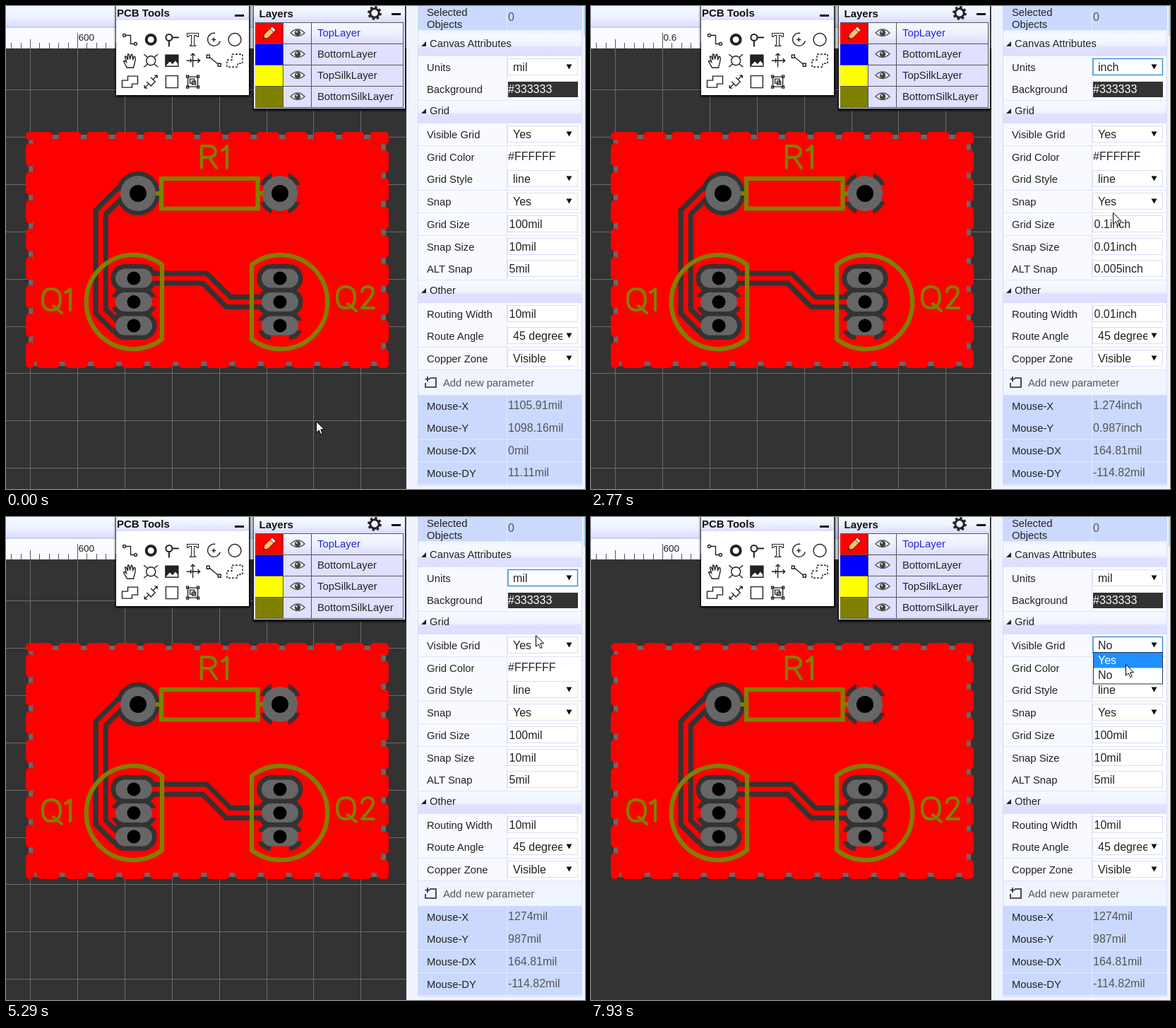
Recreate the animation shown at these times as an HTML page. Size 820 px wide and 683 px high, loop 8 s.

```html
<!DOCTYPE html>
<html lang="en">
<head>
<meta charset="utf-8">
<title>Board editor settings</title>
<style>
html, body { margin: 0; width: 100%; height: 100%; overflow: hidden; background: #333; }
svg { display: block; width: 820px; height: 683px; }
text { font: 14.8px "Liberation Sans", Arial, sans-serif; fill: #222; white-space: pre; }
.val { font-size: 16px; }
.title { font-weight: bold; font-size: 15px; fill: #111; }
.grid { stroke: #6c6c6c; stroke-width: 1; fill: none; }
.gap { stroke: #333; fill: none; stroke-width: 21; }
.trace { stroke: #f00; fill: none; stroke-width: 7; }
.silk { stroke: #808000; fill: none; stroke-width: 6.2; }
.letter { stroke: #808000; fill: none; stroke-width: 4; stroke-linecap: round; stroke-linejoin: round; }
.icon { stroke: #222; fill: none; stroke-width: 1.4; }
</style>
</head>
<body>
<svg id="stage" viewBox="0 0 820 683" xmlns="http://www.w3.org/2000/svg">
  <defs>
    <linearGradient id="head" x2="0" y2="1">
      <stop offset="0" stop-color="#f4f8ff"/><stop offset=".5" stop-color="#eef2ff"/><stop offset="1" stop-color="#dcdcff"/>
    </linearGradient>
    <linearGradient id="group" x2="0" y2="1">
      <stop offset="0" stop-color="#f6faff"/><stop offset=".5" stop-color="#f0f4ff"/>
      <stop offset=".62" stop-color="#e0e0ff"/><stop offset="1" stop-color="#dedeff"/>
    </linearGradient>
    <filter id="soft" x="-10%" y="-10%" width="120%" height="120%"><feGaussianBlur stdDeviation="1.5"/></filter>
    <clipPath id="clip"><rect x="711" y="0" width="77" height="683"/></clipPath>
  </defs>

  <rect width="820" height="683" fill="#333"/>
  <g id="grid" class="grid"></g>

  <!-- copper area -->
  <rect x="35" y="185" width="500" height="321" fill="#f00" stroke="#686868" stroke-width="6"/>
  <rect x="38" y="188" width="494" height="315" fill="#f00"/>
  <path d="M34 184H536V506H34Z" fill="none" stroke="#f00" stroke-width="12"
        stroke-linecap="round" stroke-linejoin="round" stroke-dasharray="21 19.14" stroke-dashoffset="-5.4"/>
  <path d="M34 184h.1M536 184h.1M536 506h.1M34 506h.1" stroke="#f00" stroke-width="12" stroke-linecap="round"/>
  <g id="board"></g>
  <g class="silk">
    <path d="M220 244H356.5V286.5H220ZM212 265h7M357 265h7"/>
    <path d="M221 366A66.5 66.5 0 1 0 221 471Z"/>
    <path d="M348 366A66.5 66.5 0 1 1 348 471Z"/>
  </g>
  <g class="letter">
    <path d="M277 229V198H288Q297 199 297 206Q297 213 288 214H277M288 214L298 229M306 204Q311 202 313 198V229"/>
    <path d="M64 400Q52 400 52 415Q52 430 64 430Q77 430 77 415Q77 400 64 400M67 424L79 434M84 405Q89 403 91 400V430"/>
    <path d="M481 397Q469 397 469 412Q469 427 481 427Q494 427 494 412Q494 397 481 397M484 421L496 431M504 404Q505 397 512 397Q520 397 520 404Q520 409 504 427H521"/>
  </g>

  <!-- toolbar and ruler -->
  <rect width="568" height="30" fill="url(#head)"/>
  <rect y="29" width="568" height="2" fill="#c3d3ee"/>
  <rect y="31" width="568" height="29" fill="#fbfcff"/>
  <path id="ticks" stroke="#555" fill="none"/>
  <text id="mark" x="102.5" y="48.5" style="font-size:13.6px"></text>

  <!-- tool window -->
  <rect x="155" y="-4" width="191" height="132" fill="#000" filter="url(#soft)"/>
  <rect x="156" y="0" width="188" height="20" fill="url(#head)"/>
  <rect x="156" y="20" width="188" height="106" fill="#fff"/>
  <text class="title" x="157" y="15">PCB Tools</text>
  <path d="M324 13.5h13" stroke="#111" stroke-width="3"/>
  <g id="tools" class="icon"></g>

  <!-- layer window -->
  <rect x="350" y="-4" width="217" height="152" fill="#000" filter="url(#soft)"/>
  <rect x="351" y="0" width="214" height="145" fill="#e2e2ff"/>
  <rect x="351" y="0" width="214" height="22" fill="url(#head)"/>
  <text class="title" x="358.5" y="16">Layers</text>
  <circle cx="522" cy="10" r="6.2" fill="none" stroke="#222" stroke-width="3"/>
  <circle cx="522" cy="10" r="8.4" fill="none" stroke="#222" stroke-width="3" stroke-dasharray="3.3"/>
  <path d="M546 11.5h13" stroke="#111" stroke-width="3"/>
  <g id="layers"></g>

  <!-- property panel -->
  <rect x="567" width="253" height="683" fill="#f1f4fd"/>
  <path d="M583.5 0V678H815.5V0" fill="none" stroke="#d3dafa"/>
  <path d="M819 0V42" stroke="#a9e2f0" stroke-width="2"/>
  <g id="panel"></g>
  <g id="focus"></g>
  <g id="list"></g>
  <path id="cursor" d="M.5 .5V16.2L4.2 12.8L6.8 18.6L9.2 17.5L6.7 11.8H11.6Z" fill="#fff" stroke="#000"/>
</svg>
<script>
const $ = id => document.getElementById(id);
const rect = (x, y, w, h, fill, more = '') =>
  `<rect x="${x}" y="${y}" width="${w}" height="${h}" fill="${fill}" ${more}/>`;
const text = (x, y, s, more = '') => `<text x="${x}" y="${y}" ${more}>${s}</text>`;
const path = (d, more = '') => `<path d="${d}" ${more}/>`;
const range = (n, f) => Array.from({ length: n }, (_, i) => f(i)).join('');

$('grid').innerHTML = path(
  range(8, i => `M${Math.round(35 + i * 66.9) - .5} 60V683`) +
  range(9, i => `M0 ${Math.round(118 + i * 66.9) + .5}H567`));
$('ticks').setAttribute('d', range(27, i => {
  const k = i - 7, len = k % 10 === 0 ? 22 : k % 5 === 0 ? 13 : 8;
  return `M${Math.round(102 + k * 13.38) - .5} 60v${-len}`;
}));

function drawBoard() {
  const rows = [385, 418.5, 452];
  const slot = (x, y, w, h, fill) => rect(x - w / 2, y - h / 2, w, h, fill, `rx="${h / 2}"`);
  const disc = (x, y, r, fill) => `<circle cx="${x}" cy="${y}" r="${r}" fill="${fill}"/>`;
  const wires = ['M187 265H161L134.2 291.8V432L154.3 452H181', 'M181 385H281.4L314.9 418.5H388'];
  let s = wires.map(d => path(d, 'class="gap"')).join('');
  s += disc(187, 265, 31, '#333') + disc(388, 265, 31, '#333');
  s += path('M388 232V298M355 265H421', 'stroke="#f00" stroke-width="24"');
  for (const y of rows) s += slot(181, y, 65, 40, '#333') + slot(388, y, 65, 40, '#333');
  // spokes joining pads to the copper
  s += path('M147 418.5H215M354 452H422', 'stroke="#f00" stroke-width="14"');
  s += rect(375, 464, 26, 9, '#f00');
  s += wires.map(d => path(d, 'class="trace"')).join('');
  for (const x of [187, 388]) s += disc(x, 265, 25, '#666') + disc(x, 265, 12, '#000');
  for (const x of [181, 388])
    for (const y of rows) s += slot(x, y, 52, 27, '#666') + disc(x, y, 9.5, '#000');
  $('board').innerHTML = s;
}

function drawTools() {
  const dot = (x, y, r) => `M${x - r} ${y}a${r} ${r} 0 1 0 ${2 * r} 0a${r} ${r} 0 1 0 ${-2 * r} 0`;
  const icons = [
    [dot(-8, -6, 2) + 'M-6 -6H1V6H6' + dot(8, 6, 2)],
    [dot(0, 0, 6.5), 'stroke-width="4"'],
    [dot(-4, -3, 4.5) + 'M1 -3H10M-4 2V10', 'stroke-width="2"'],
    ['M-8 -9H8V-4H6L5 -6H2V7L4 9H-4L-2 7V-6H-5L-6 -4H-8Z', 'stroke-width="1.1"'],
    ['M2 -9A9 9 0 1 0 9 2M-3 0H3M0 -3V3'],
    [dot(0, 0, 9)],
    ['M-4 10L-9 1Q-8 -1 -5 2L-7 -6Q-5 -8 -3 -1L-3 -9Q-1 -11 0 -2L2 -9Q4 -10 4 -1L6 -6Q9 -6 7 2L5 10Z'],
    [dot(0, 0, 6.5) + 'M-10 -9L-5 -5M10 -9L5 -5M-10 9L-5 5M10 9L5 5'],
    ['M-9 -8H9V8H-9ZM-9 7L-3 0L1 4L5 -1L9 4V8H-9Z', 'style="fill:#222" fill-rule="evenodd"'],
    ['M-9 0H10M0 -10V9M-3 -7L0 -10L3 -7M7 -3L10 0L7 3M-3 -3V3'],
    ['M-6 -5L6 5M-10 -8h4v4h-4ZM6 4h4v4h-4Z'],
    ['M-4 -9H11V4H4V9H-11V-1H-4Z', 'stroke-dasharray="3 2"'],
    ['M-3 -8H11V3H3V8H-11V-2H-3Z'],
    ['M-9 9L-3 3M9 -9L3 -3M-9 9V5M-9 9H-5M9 -9V-5M9 -9H5M-6 0L0 6L6 0L0 -6'],
    ['M-8.5 -8.5H8.5V8.5H-8.5Z'],
    ['M-7 -7H7V7H-7ZM-4 -4H2V2H-4ZM-1 -1H4V4H-1ZM-9 -9h3v3h-3ZM6 -9h3v3h-3ZM-9 6h3v3h-3ZM6 6h3v3h-3Z']
  ];
  $('tools').innerHTML = icons.map(([d, more], i) =>
    path(d, `transform="translate(${175.5 + i % 6 * 29.7} ${47.5 + Math.floor(i / 6) * 29.8})" ${more || ''}`)).join('');
}

function drawLayers() {
  const layers = [['TopLayer', '#f00'], ['BottomLayer', '#00f'], ['TopSilkLayer', '#ff0'], ['BottomSilkLayer', '#808000']];
  $('layers').innerHTML = layers.map(([name, color], i) => {
    const y = 23 + i * 30;
    return rect(353, y, 39, 30, color) + rect(392, y, 171, 30, i ? '#e0e0ff' : 'url(#head)') +
      path(`M353 ${y + .5}H563M392.5 ${y}v30M432.5 ${y}v30M353 ${y + 30.5}H563M562.5 ${y}v30`, 'stroke="#555" fill="none"') +
      path(`M403 ${y + 15}Q413 ${y + 5} 423 ${y + 15}Q413 ${y + 24} 403 ${y + 15}Z`, 'fill="#fff" stroke="#555" stroke-width="1.5"') +
      `<circle cx="413" cy="${y + 15}" r="4.3" fill="#444"/><circle cx="411.8" cy="${y + 13.5}" r="1.3" fill="#ddd"/>` +
      text(441, y + 20, name, i ? '' : 'style="fill:#22d"');
  }).join('') +
    path('M364 47L366 40L377 29L382 34L371 45Z', 'fill="#ffc06a" stroke="#6b3a12"') +
    path('M374 32L377 29L382 34L379 37Z', 'fill="#f5e6dc" stroke="#6b3a12"') +
    path('M364 47L365 43.5L367.5 46Z', 'fill="#222"');
}

// label, middle of row, kind, value per unit system
const rows = [
  ['Units', 87, 'select', 'mil', 'inch'],
  ['Background', 118, 'dark', '#333333'],
  ['Visible Grid', 182, 'select', 'Yes'],
  ['Grid Color', 213.5, 'plain', '#FFFFFF'],
  ['Grid Style', 245, 'select', 'line'],
  ['Snap', 277, 'select', 'Yes'],
  ['Grid Size', 309, 'input', '100mil', '0.1inch'],
  ['Snap Size', 341, 'input', '10mil', '0.01inch'],
  ['ALT Snap', 372, 'input', '5mil', '0.005inch'],
  ['Routing Width', 436, 'input', '10mil', '0.01inch'],
  ['Route Angle', 467, 'select', '45 degree'],
  ['Copper Zone', 499, 'select', 'Visible'],
  ['Mouse-X', 565.5, 'mouse', '1274mil', '1.274inch'],
  ['Mouse-Y', 597, 'mouse', '987mil', '0.987inch'],
  ['Mouse-DX', 629, 'mouse', '164.81mil'],
  ['Mouse-DY', 660.5, 'mouse', '-114.82mil']
];

function drawPanel() {
  const blue = '#cad9fd';
  let s = rect(584, 0, 231, 34, blue) + text(596, 14, 'Selected') + text(596, 31, 'Objects') +
    text(711, 21, '0', 'class="val" style="fill:#555"') + path('M709.5 0V34M584 34.5H815', 'stroke="#e4ebff"');
  for (const [name, y] of [['Canvas Attributes', 53], ['Grid', 148], ['Other', 402]])
    s += rect(584, y - 14, 231, 32, 'url(#group)') + path(`M588 ${y + 4}h7v-7Z`, 'fill="#222"') + text(600, y + 5, name);
  s += rect(584, 516, 231, 34, '#f0f4ff') + text(619, 538, 'Add new parameter', 'style="fill:#555"') +
    path('M600 526H609V539H594V533M597 524V531M593.5 527.5H600.5', 'fill="none" stroke="#222" stroke-width="1.6"');
  rows.forEach(([label, y, kind, value], i) => {
    const top = Math.round(y - 16), mouse = kind === 'mouse', sel = kind === 'select';
    s += rect(584, top, 231, 32, mouse ? blue : '#f8faff');
    if (!mouse) s += rect(710, top, 105, 32, '#fff');
    s += path(`M584 ${top + 31.5}H815M709.5 ${top}v32`, `stroke="${mouse ? '#e4ebff' : '#dfe3fb'}"`);
    if (sel || kind === 'input')
      s += rect(710.5, Math.round(y - 13) + .5, 99, 23, '#fff', 'stroke="#d8dcf8"');
    if (sel) s += path(`M793.5 ${y - 4.5}h8l-4 7Z`, 'fill="#111"');
    if (kind === 'dark') s += rect(711, y - 11, 99, 22, '#333');
    const x = sel ? 718 : kind === 'input' ? 712.5 : 711;
    const fill = mouse ? '#555' : kind === 'dark' ? '#fff' : '#222';
    s += text(596, y + 5, label) +
      `<g clip-path="url(#clip)" ${sel ? '' : 'style="clip-path:none"'}>` +
      text(x, y + 4.5, value, `id="v${i}" class="val" style="fill:${fill}"`) + '</g>';
  });
  $('panel').innerHTML = s;
}

drawBoard();
drawTools();
drawLayers();
drawPanel();

// spans of stepped movement: start, end, number of steps
const moves = [
  [360, 440, 2], [670, 910, 4], [1060, 1230, 3], [1380, 1790, 6], [2010, 2310, 5], [2470, 3260, 11], [3320, 3880, 8],
  [4120, 4900, 11], [4980, 5590, 9], [5820, 6210, 6], [6590, 6590, 1], [7060, 7850, 11], [7930, 7930, 1]
];
// pointer: time, x, y
const trail = [
  [0, 439, 587], [359, 439, 587], [360, 600, 447], [670, 808, 47], [910, 796, 76], [1230, 785, 71],
  [1380, 774, 84], [1626, 737, 122], [1790, 738, 130], [2310, 738, 134], [2470, 736, 160], [2786, 739, 292],
  [2944, 737, 298], [3260, 786, 88], [3400, 802, 78], [3560, 798, 80], [3880, 745, 104], [4120, 742, 105],
  [4432, 699, 118], [4900, 690, 148], [4980, 686, 156], [5440, 783, 172], [5590, 776, 178], [5820, 768, 188],
  [6054, 750, 208], [6210, 752, 217], [6590, 740, 215], [7060, 748, 212], [7376, 772, 181],
  [7540, 780, 176], [7850, 759, 210], [7930, 757, 208], [8000, 757, 208]
];

function stepTime(t) {
  let held = 0;
  for (const [a, b, n] of moves) {
    if (t < a) break;
    const gap = n > 1 ? (b - a) / (n - 1) : 1;
    held = a + Math.min(n - 1, Math.floor((t - a) / gap + .25)) * gap;
  }
  return held;
}

function pointer(t) {
  const i = Math.max(1, trail.findIndex(p => p[0] >= t));
  const [a, x, y] = trail[i - 1], [b, u, v] = trail[i];
  const k = (t - a) / (b - a);
  return [Math.round(x + (u - x) * k), Math.round(y + (v - y) * k)];
}

const within = (t, a, b) => t >= a && t < b;
const put = (id, s) => { if ($(id).textContent !== s) $(id).textContent = s; };

function listBox(top, items, chosen, y) {
  const h = 21.4, at = Math.floor((y - top - 1) / h);
  const hot = at >= 0 && at < items.length ? at : chosen;
  return rect(711.5, top + .5, 98, Math.round(items.length * h) + 1.5, '#fff', 'stroke="#26344d"') +
    items.map((s, i) => (i === hot ? rect(712, top + 1 + i * h, 97, h, '#1e90ff') : '') +
      text(718, top + 17 + i * h, s, `class="val" ${i === hot ? 'style="fill:#fff"' : ''}`)).join('');
}

let lastList = '', lastFocus = '';
function draw(t) {
  const [x, y] = pointer(stepTime(t));
  const inch = within(t, 2010, 4120), gridOn = t < 6760, early = t < 360;
  const now = rows.map(r => inch && r[4] || r[3]);
  now[2] = gridOn ? 'Yes' : 'No';
  if (t < 2010) [now[12], now[13]] = early ? ['1105.91mil', '1098.16mil'] : ['1274.43mil', '987.05mil'];
  if (early) [now[14], now[15]] = ['0mil', '11.11mil'];
  now.forEach((s, i) => put('v' + i, s));
  put('mark', inch ? '0.6' : '600');
  $('grid').style.display = gridOn ? '' : 'none';

  const focusY = t < 1145 ? 0 : t < 5440 ? 74 : 169;
  const focus = focusY ? rect(711, focusY + .5, 98.5, 23, 'none', 'stroke="#3f8fe6" stroke-width="1.5"') : '';
  let list = '';
  if (within(t, 1145, 2010) || within(t, 3560, 4120)) list = listBox(96, ['mil', 'inch', 'mm'], inch ? 1 : 0, y);
  else if (within(t, 5440, 6760) || t >= 7540) list = listBox(191, ['Yes', 'No'], gridOn ? 0 : 1, y);
  if (focus !== lastFocus) $('focus').innerHTML = lastFocus = focus;
  if (list !== lastList) $('list').innerHTML = lastList = list;

  $('cursor').style.display = within(t, 440, 670) ? 'none' : '';
  $('cursor').setAttribute('transform', `translate(${x} ${y})`);
}

const start = performance.now();
function tick() {
  draw((performance.now() - start) % 8000);
  requestAnimationFrame(tick);
}
tick();
</script>
</body>
</html>
```
